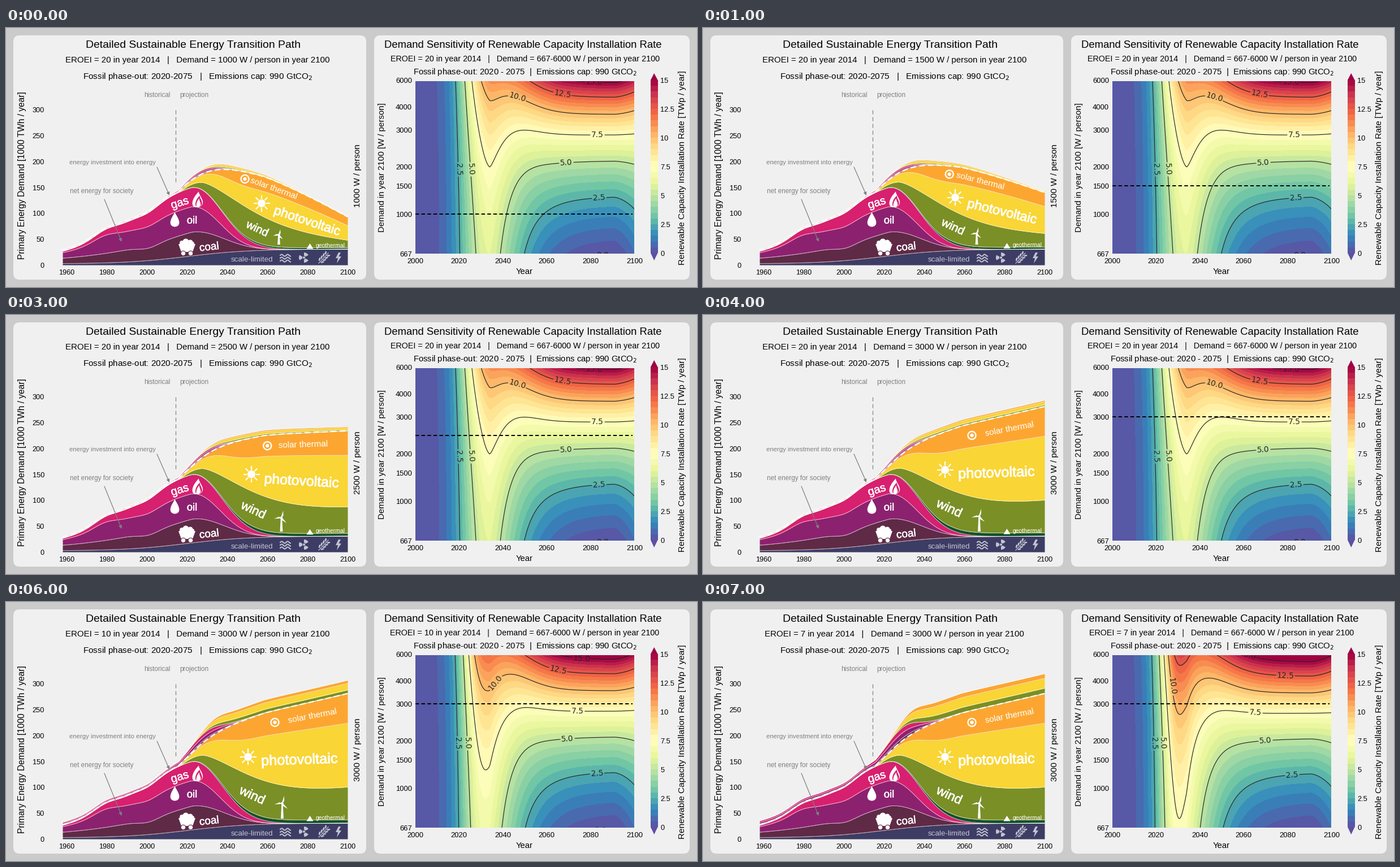
Animation of 1222 by 458 pixels, one loop 8000 ms. Source, as a matplotlib script:

```python
import numpy as np
import matplotlib.pyplot as plt
from matplotlib.animation import FuncAnimation
from matplotlib.patches import Circle, Ellipse, FancyBboxPatch, Polygon, Rectangle, Wedge
from matplotlib.patheffects import withStroke

W, H = 1222, 458
PT = 0.72  # points per pixel at 100 dpi
plt.rcParams["font.family"] = "Liberation Sans"

# (demand in W per person, EROEI)
SCENES = [(d, 20) for d in range(1000, 3001, 500)] + [(3000, e) for e in (14, 10, 7)]

LIMITED, COAL, OIL, GAS = "#3d3c64", "#5f2a46", "#8c2170", "#d7206f"
GEO, WIND, PV, SOLAR = "#14522a", "#7a8f26", "#f9d535", "#fca631"
PANEL, GREY, PALE = "#f0f0f0", "#808080", "#c3c3d3"

fig = plt.figure(figsize=(W / 100, H / 100), dpi=100, facecolor="#cbcbcb")


def frame(ax, left=0, right=W, top=0, bottom=H):
    ax.set_xlim(left, right)
    ax.set_ylim(bottom, top)
    ax.axis("off")


def stage():
    ax = fig.add_axes([0, 0, 1, 1])
    frame(ax)
    return ax


back, live = stage(), stage()
HEAT = (724, 1111, 94, 398.5)
heat = fig.add_axes([HEAT[0] / W, 1 - HEAT[3] / H,
                     (HEAT[1] - HEAT[0]) / W, (HEAT[3] - HEAT[2]) / H])
top = stage()


# ---- curve and drawing helpers -------------------------------------------

def rise(x, centre, width):
    return 1 / (1 + np.exp(-(x - centre) / width))


def bell(x, centre, width):
    return np.exp(-((x - centre) / width) ** 2)


def hump(x, peak, left, right, pl=2.0, pr=2.0):
    """Bell of height 1 with its own width and power on each side."""
    d = np.abs(x - peak)
    return np.where(x < peak, np.exp(-(d / left) ** pl), np.exp(-(d / right) ** pr))


def write(ax, x, y, s, size, color="black", rot=0, ha="center", heavy=0):
    r = np.radians(rot)
    t = ax.text(x + 0.36 * size * np.sin(r), y + 0.36 * size * np.cos(r), s,
                fontsize=size * PT, color=color, rotation=rot, ha=ha,
                va="baseline", rotation_mode="anchor")
    if heavy:
        t.set_path_effects([withStroke(linewidth=heavy, foreground=color)])


def line(ax, x, y, color, width, **kw):
    ax.plot(x, y, color=color, lw=width * PT, **kw)


def fill(ax, pts, color="white"):
    ax.add_patch(Polygon(pts, fc=color, ec="none"))


def dot(ax, x, y, r, color="white"):
    ax.add_patch(Circle((x, y), r, fc=color, ec="none"))


def drop(ax, x, y, w, h, color="white", sway=0):
    t = np.linspace(0, 2 * np.pi, 80)
    px = w * np.sin(t) * np.abs(np.sin(t / 2)) ** 1.5 * 1.2
    fill(ax, np.c_[x + px + sway * np.cos(t) ** 3, y - h * np.cos(t)], color)


# ---- fixed parts ---------------------------------------------------------

DEMAND_Y = {667: 399, 1000: 329, 1500: 279, 2000: 245.5, 3000: 180, 4000: 139, 6000: 92}


def draw_back():
    for x, w in ((13, 624), (651, 558)):
        back.add_patch(FancyBboxPatch((x, 13), w, 432, fc=PANEL, ec="none",
                                      boxstyle="round,pad=0,rounding_size=11"))
    write(back, 331, 28, "Detailed Sustainable Energy Transition Path", 19.4)
    write(back, 339, 84, "Fossil phase-out: 2020-2075   |   Emissions cap: 990 GtCO$_2$", 15.3)
    write(back, 914.5, 28, "Demand Sensitivity of Renewable Capacity Installation Rate", 18.55)
    write(back, 918, 77, "Fossil phase-out: 2020 - 2075  |  Emissions cap: 990 GtCO$_2$", 14.9)

    write(back, 27, 261, "Primary Energy Demand [1000 TWh / year]", 15.5, rot=90)
    write(back, 664, 247, "Demand in year 2100 [W / person]", 15, rot=90)
    write(back, 1194, 247, "Renewable Capacity Installation Rate [TWp / year]", 15.4, rot=90)
    write(back, 917, 430, "Year", 14.7)

    for v in range(0, 301, 50):
        write(back, 68, 419 - v * 0.914, str(v), 12.8, ha="right")
    for year in range(1960, 2101, 20):
        write(back, 604.5 - (2100 - year) * 3.55, 431, str(year), 12.6)
    for year in range(2000, 2101, 20):
        write(back, 723.5 + (year - 2000) * 3.88, 411, str(year), 13)
    for v, y in DEMAND_Y.items():
        write(back, 718, y, str(v), 13, ha="right")

    cmap = plt.get_cmap("Spectral_r")
    for k in range(30):
        y = 398 - (k + 1) * 10.2
        back.add_patch(Rectangle((1140, y), 12.5, 10.2, fc=cmap((k + 0.5) / 30),
                                 ec="none", antialiased=False))
    fill(back, [(1140, 92), (1152.5, 92), (1146.2, 80)], cmap(1.0))
    fill(back, [(1140, 398), (1152.5, 398), (1146.2, 411)], cmap(0.0))
    for k in range(7):
        write(back, 1157.5, 398 - 51 * k, f"{2.5 * k:g}", 12.8, ha="left")

    write(back, 267, 118, "historical", 11.8, GREY)
    write(back, 333, 118, "projection", 11.8, GREY)
    line(back, [299.5] * 2, [145, 276], GREY, 1.2, dashes=(6, 4))
    write(back, 188, 237, "energy investment into energy", 11.4, GREY)
    write(back, 169.5, 288, "net energy for society", 11.7, GREY)


def arrow(a, b):
    top.annotate("", b, a, arrowprops=dict(
        arrowstyle="-|>,head_width=0.16,head_length=0.32", color=GREY,
        lw=0.9, shrinkA=0, shrinkB=0))


def draw_top():
    arrow((267, 246), (289, 296))
    arrow((174, 303), (204.5, 378))

    write(top, 307, 308, "gas", 20, "white", 17, heavy=0.3)
    drop(top, 339, 303, 11, 14, sway=2)
    drop(top, 341, 306, 7, 10, GAS, sway=2)
    drop(top, 340.5, 309, 4.5, 8, sway=1.5)
    write(top, 329, 339, "oil", 18.5, "white", heavy=0.3)
    drop(top, 298.5, 338.5, 9.3, 13)
    write(top, 359, 386, "coal", 19, "white", 6, heavy=0.3)
    fill(top, [(305, 382), (335, 382), (330, 396), (310, 396)])
    for x, y, r in ((311, 380, 4), (318, 378, 5.5), (326, 379, 4.5), (330, 381, 3)):
        dot(top, x, y, r)
    for x in (313.5, 326.5):
        dot(top, x, 398.5, 4.8, COAL)
        dot(top, x, 398.5, 3.7)

    write(top, 435, 408.5, "scale-limited", 13.4, PALE)
    x = np.linspace(485, 503, 40)
    for y in (402, 407, 412):
        line(top, x, y - 1.6 * np.sin((x - 485) * 0.6), PALE, 2)
    for a in (60, 180, 300):
        top.add_patch(Wedge((527, 406), 9, a - 30, a + 30, fc=PALE, ec="none"))
    dot(top, 527, 406, 3, LIMITED)
    dot(top, 527, 406, 2, PALE)
    line(top, [553, 570], [416, 398], PALE, 1.2)
    for k in range(4):
        bx, by = 557 + 3.6 * k, 411.5 - 3.8 * k
        for side, a in ((-2.5, 75), (2.5, 15)):
            top.add_patch(Ellipse((bx + side, by + side), 6.4, 2.8, angle=-a, fc=PALE, ec="none"))
    fill(top, [(588, 397), (583, 407), (587, 407), (585, 416), (593, 404), (588.5, 404), (592, 397)], PALE)


# ---- stacked areas -------------------------------------------------------

BASE, NOW, END = 419, 305, 604
X = np.linspace(100, END, 505)
AHEAD = np.clip((X - NOW) / (END - NOW), 0, 1)
SPREAD = np.clip((X - 320) / (END - 320), 0, 1) ** 1.3

# heights above the baseline; each fuel peaks and is phased out
limited = 2 + 26 * rise(X, 320, 55)
coal = limited + 42 * hump(X, 330, 165, 76, 1.2) - 6 * bell(X, 252, 25)
oil = coal + 45 * hump(X, 323, 180, 68, 2, 2.3) + 9 * bell(X, 175, 30)
gas = oil + 34 * hump(X, 335, 145, 82)


def mix_for(demand):
    """Heights of the layers above gas, up to the net demand."""
    shift = (demand - 2000) / 1000
    start = np.interp(NOW, X, gas) + 1
    net = (start + 61 * np.tanh((X - NOW) / 62)
           - 19 * np.clip((X - 455) / 149, 0, 1) ** 1.2 + 86 * shift * SPREAD)
    net = np.where(X < NOW, gas + 1, np.maximum(net, gas + 1))
    thermal = 34 * rise(X, 386, 18) + 18.5 * shift * SPREAD
    pv = np.where(X < 320, net, net - thermal)
    wind = 66 + 81 * hump(X, 347, 79, 105, 2, 1.5) + 24 * shift * SPREAD
    wind = np.clip(wind, gas, pv)
    geo = gas + (1.5 + 1.5 * demand / 1000) * np.clip((X - 330) / 110, 0, 1)
    return np.minimum(geo, wind), wind, pv, net


def invested(demand, eroei):
    """Energy spent on energy, and the fossil part of it."""
    fade = (demand / 3000) ** (2.2 * AHEAD ** 1.4)
    built = rise(X, 328, 14)
    total = (35 * built * fade + 8 * bell(X, 372, 25) + 7 * (1 - built)) * 6 / (eroei - 1)
    return total, 1 - rise(X, 367, 22)


def draw_areas(demand, eroei):
    geo, wind, pv, net = mix_for(demand)
    layers = [(limited, LIMITED), (coal, COAL), (oil, OIL), (gas, GAS),
              (geo, GEO), (wind, WIND), (pv, PV), (net, SOLAR)]
    total, fossil = invested(demand, eroei)
    h = net
    for part, shares in ((fossil, ((0.2, COAL), (0.4, OIL), (0.4, GAS))),
                         (1 - fossil, ((0.27, WIND), (0.5, PV), (0.23, SOLAR)))):
        for share, color in shares:
            h = h + total * part * share
            layers.append((h, color))

    low = np.zeros_like(X)
    for h, color in layers:
        live.fill_between(X, BASE - h, BASE - low, color=color, lw=0)
        low = h
    for h, _ in layers:
        line(live, X, BASE - h, "white", 0.8, alpha=0.75)
    line(live, X, BASE - net, "white", 2.2, dashes=(4.5, 2.5))
    draw_area_labels(demand / 1000, geo, wind, pv, net)


def draw_area_labels(k, geo, wind, pv, net):
    def middle(x, a, b):
        """Height between two curves, and the slope there in degrees."""
        l, m, r = np.interp([x - 35, x, x + 35], X, (a + b) / 2)
        return BASE - m, np.degrees(np.arctan2(r - l, 70))

    x = 440 + 34 * k
    y, rot = middle(x, pv, net)
    write(live, x, y, "solar thermal", 15.1, "white", rot)
    x = 396 + 26.5 * k
    y, _ = middle(x, pv, net)
    live.add_patch(Circle((x, y), 7, fc="none", ec="white", lw=1.7))
    dot(live, x, y, 3.2)

    x = 540 - 7 * k
    y, rot = middle(x, wind, pv)
    write(live, x, y, "photovoltaic", 21.8 + 1.2 * k, "white", rot, heavy=0.6)
    x = 464 - 12 * k
    y, _ = middle(x, wind, pv)
    dot(live, x, y, 7)
    for a in np.arange(8) * np.pi / 4:
        reach = np.array([9, 13.5])
        line(live, x + np.cos(a) * reach, y + np.sin(a) * reach, "white", 2.2)

    x = 449.5 - 4.5 * k
    y, _ = middle(x, geo, wind)
    write(live, x, y, "wind", 18.5 + 1.5 * k, "white", -25, heavy=0.4)
    x, foot, r = 479.5 + 3 * k, 383, 8.5 + 1.8 * k
    hub = np.array([x, foot - 12 - 5 * k])
    fill(live, [hub - (1.2, 0), hub + (1.2, 0), (x + 2.4, foot), (x - 2.4, foot)])
    for a in np.radians([-75, 45, 172]):
        u, v = np.array([np.cos(a), np.sin(a)]), np.array([-np.sin(a), np.cos(a)])
        fill(live, [hub - v, hub + 0.3 * r * u + 2.4 * v, hub + r * u, hub - v])
    dot(live, *hub, 2.2)

    y = 385.5 - 1.5 * k
    write(live, 574, y, "geothermal", 10.4, "white")
    fill(live, [(531.5, y + 6.5), (537.5, y - 3), (543.5, y + 6.5)])


# ---- heat map ------------------------------------------------------------

HX, HY = np.linspace(724, 1111, 388), np.linspace(94, 399, 306)
GROWTH = 0.0058
TAIL = np.clip((HX - 1075) / 36, 0, 1) ** 1.5
# rate = floor + slope * (relative demand - 1)
FLOOR = 6 * hump(HX, 855, 56, 68, 2, 1.35) + 0.9 * TAIL
SLOPE = 0.75 * rise(HX, 817, 9.5) + 2.4 * rise(HX, 916, 32) - 0.42 * TAIL
EXTRA = 0.065 * rise(HX, 800, 6) + 0.32 * bell(HX, 828, 25)


def draw_heat(demand, eroei):
    k = (1 / (eroei - 1) - 1 / 19) / (1 / 6 - 1 / 19)
    gain = 1 + k * EXTRA
    z = gain * (FLOOR + SLOPE * np.expm1(GROWTH * (399 - HY))[:, None])
    heat.contourf(HX, HY, z, levels=np.arange(0, 15.1, 0.5), cmap="Spectral_r",
                  vmin=0, vmax=15, extend="both")

    def spot(v, x):
        """Point of level v in the column at x."""
        i = int(x - HX[0])
        rel = max((v / gain[i] - FLOOR[i]) / SLOPE[i], 0)
        return x, np.clip(399 - np.log1p(rel) / GROWTH, 96, 397)

    label_x = {2.5: 1049 - 7 * k, 5: 991 + 4 * k, 7.5: 1046 - 69 * k, 10: 904 - 75 * k,
               12.5: 984 - 80 * k + 126 * k * k, 15: 1040 - 84 * k * k}
    for v, x in label_x.items():
        cs = heat.contour(HX, HY, z, levels=[v], colors="#262626", linewidths=0.85)
        spots = [spot(v, x)]
        if v <= 5:
            row = 156
            spots.append((np.interp(v, z[row, :105], HX[:105]), HY[row]))
        for t in heat.clabel(cs, manual=spots, fmt="%.1f", fontsize=10, inline_spacing=3):
            t.set_fontfamily("DejaVu Sans")
    heat.text(1055 - 8 * k, 400.5 + 3 * k, "0.0", fontsize=10, color="#262626",
              family="DejaVu Sans", ha="center", va="center_baseline", clip_on=True)
    y = np.interp(demand, list(DEMAND_Y), list(DEMAND_Y.values()))
    line(heat, [724, 1108], [y, y], "black", 2, dashes=(3.2, 2.1))


def update(i):
    demand, eroei = SCENES[i]
    live.clear()
    frame(live)
    heat.clear()
    frame(heat, *HEAT)
    head = f"EROEI = {eroei} in year 2014   |   Demand = "
    tail = " W / person in year 2100"
    write(live, 338.5, 56, f"{head}{demand}{tail}", 15)
    write(live, 917.5, 54, f"{head}667-6000{tail}", 14.45)
    write(live, 620, 261, f"{demand} W / person", 15.3, rot=90)
    draw_areas(demand, eroei)
    draw_heat(demand, eroei)
    return []


draw_back()
draw_top()
anim = FuncAnimation(fig, update, frames=len(SCENES), interval=1000,
                     repeat=True, repeat_delay=0, blit=False)
plt.show()
```
